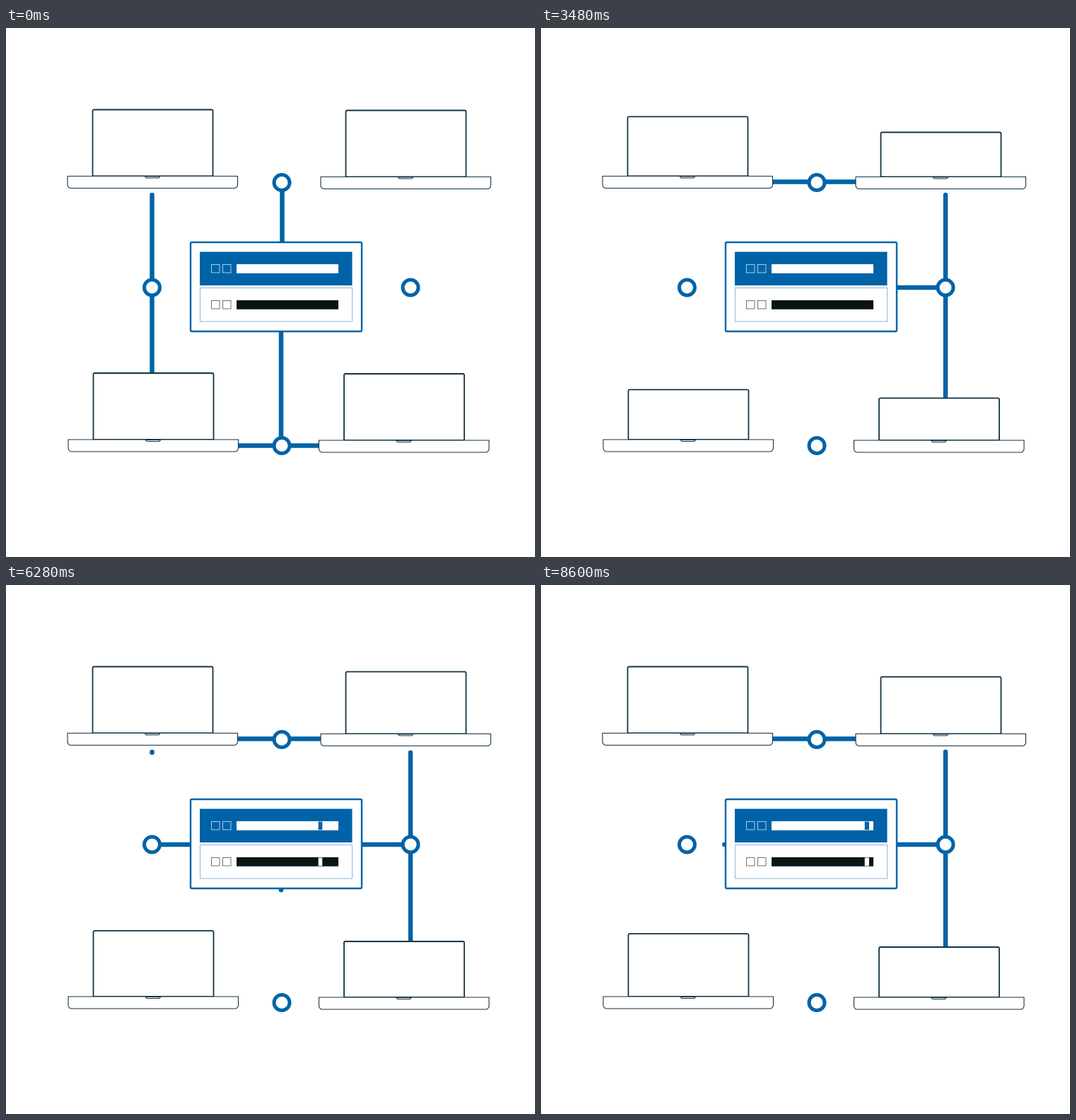
An HTML page with a canvas for the animation above (8.64 s loop, 748 by 748 pixels).

```html
<!DOCTYPE html>
<html lang="en">
<head>
<meta charset="utf-8">
<title>Server network</title>
<style>
html, body { margin: 0; width: 100%; height: 100%; overflow: hidden; background: #fff; }
canvas { display: block; }
</style>
</head>
<body>
<canvas id="stage" width="748" height="748"></canvas>
<script>
const ctx = document.getElementById('stage').getContext('2d');
const LOOP = 8640, CYCLE = 2428, STEP = 40;
const BLUE = '#0063a8', NAVY = '#143344', BLACK = '#0a1414';

const linear = (u, from, to) => Math.min(1, Math.max(0, (u - from) / (to - from)));
const ease = (u, from, to) => (1 - Math.cos(Math.PI * linear(u, from, to))) / 2;
const mix = (a, b, k) => a + (b - a) * k;

// Draws the part of a cable between the fractions a and b.
function cable(x1, y1, x2, y2, a, b) {
  if (a >= b) return;
  ctx.beginPath();
  ctx.moveTo(mix(x1, x2, a), mix(y1, y2, a));
  ctx.lineTo(mix(x1, x2, b), mix(y1, y2, b));
  ctx.stroke();
}

function cables(u) {
  ctx.strokeStyle = BLUE;
  ctx.lineWidth = 6.5;
  ctx.lineCap = 'round';
  const back = ease(u, 0, 800);
  const late = ease(u, 1380, 2150);
  const early = ease(u, 1280, 2020);

  // Full at the start of a cycle, drawn back and extended again
  cable(206.5, 236, 206.5, 367, 0, 1 - back + late);
  cable(206.5, 525, 206.5, 367, 0, 1 - back + early);
  cable(390.5, 308, 390.5, 218, 0, 1 - ease(u, 0, 450) + late);
  cable(389, 430, 389, 590, 0, 1 - back + late);
  cable(250, 590.5, 390, 590.5, 0, 1 - back + early);
  cable(490, 590.5, 390, 590.5, 0, 1 - ease(u, 160, 900) + early);

  // Passing through from one end to the other
  cable(572, 236, 572, 367, late, back);
  cable(572, 545, 572, 367, early, back);
  cable(482, 217.5, 390, 217.5, early, back);
  cable(390, 217.5, 310, 217.5, ease(u, 1430, 1800), back);
  cable(572, 367, 495, 367, ease(u, 2100, 2400), ease(u, 780, 1000));
  cable(265, 367, 207, 367, 0, linear(u, 1300, 1465));
}

function node(x, y) {
  ctx.beginPath();
  ctx.arc(x, y, 11, 0, Math.PI * 2);
  ctx.fillStyle = '#fff';
  ctx.fill();
  ctx.lineWidth = 5;
  ctx.strokeStyle = BLUE;
  ctx.stroke();
}

function laptop(x, y, start, u) {
  const dip = 34.5 * (ease(u, start, start + 590) - ease(u, start + 590, start + 1310));
  ctx.fillStyle = '#fff';
  ctx.strokeStyle = NAVY;
  ctx.lineWidth = 1.8;
  ctx.beginPath();
  ctx.roundRect(x + 35.5, y - 93.5 + dip, 170, 94 - dip, [2, 2, 0, 0]);
  ctx.fill();
  ctx.stroke();

  ctx.lineWidth = 1.1;
  ctx.beginPath();
  ctx.moveTo(x, y + .5);
  ctx.lineTo(x + 109, y + .5);
  ctx.lineTo(x + 111, y + 3);
  ctx.lineTo(x + 129, y + 3);
  ctx.lineTo(x + 131, y + .5);
  ctx.lineTo(x + 240.5, y + .5);
  ctx.arcTo(x + 240.5, y + 17.5, x + 234, y + 17.5, 5);
  ctx.arcTo(x, y + 17.5, x, y + 12, 5);
  ctx.closePath();
  ctx.fill();
  ctx.stroke();
}

function unit(y, color, outline, u) {
  const left = 470 - 144 * linear(u, 1108, 1820) ** 2;
  const right = 470 - 144 * linear(u, 1277, 2207);
  const glow = ease(u, 0, 550) - ease(u, 550, 1100);
  ctx.lineWidth = 1;
  ctx.strokeStyle = outline;
  ctx.fillStyle = color;
  for (const x of [290, 306]) {
    ctx.globalAlpha = glow;
    ctx.fillRect(x, y, 12.5, 12.5);
    ctx.globalAlpha = 1;
    ctx.strokeRect(x + .5, y + .5, 11.5, 11.5);
  }
  ctx.strokeRect(326.5, y + .5, 143, 12);
  ctx.fillRect(326, y, left - 326, 12.5);
  ctx.fillRect(right, y, 470 - right, 12.5);
}

function server(u) {
  ctx.fillStyle = '#fff';
  ctx.strokeStyle = BLUE;
  ctx.lineWidth = 2.4;
  ctx.beginPath();
  ctx.roundRect(261, 303, 242, 126, 2);
  ctx.fill();
  ctx.stroke();
  ctx.fillStyle = BLUE;
  ctx.fillRect(274, 316.5, 215.5, 47.5);
  ctx.strokeStyle = '#8db8d8';
  ctx.lineWidth = 1;
  ctx.strokeRect(274.5, 367.5, 215, 47.5);
  unit(334, '#fff', '#a8cbe2', u);
  unit(385, BLACK, '#6d7272', u);
}

function draw(now) {
  const t = Math.floor(now % LOOP / STEP) * STEP;
  const u = t % CYCLE;
  ctx.fillStyle = '#fff';
  ctx.fillRect(0, 0, 748, 748);
  cables(u);
  node(206.5, 367);
  node(390, 218.5);
  node(572, 367);
  node(390, 590.5);
  laptop(87, 209, 0, u);
  laptop(88, 581.5, 186, u);
  laptop(445, 210, 313, u);
  laptop(442.5, 582.5, 444, u);
  server(u);
}

const begin = performance.now();
function tick() {
  draw(performance.now() - begin);
  requestAnimationFrame(tick);
}
tick();
</script>
</body>
</html>
```
